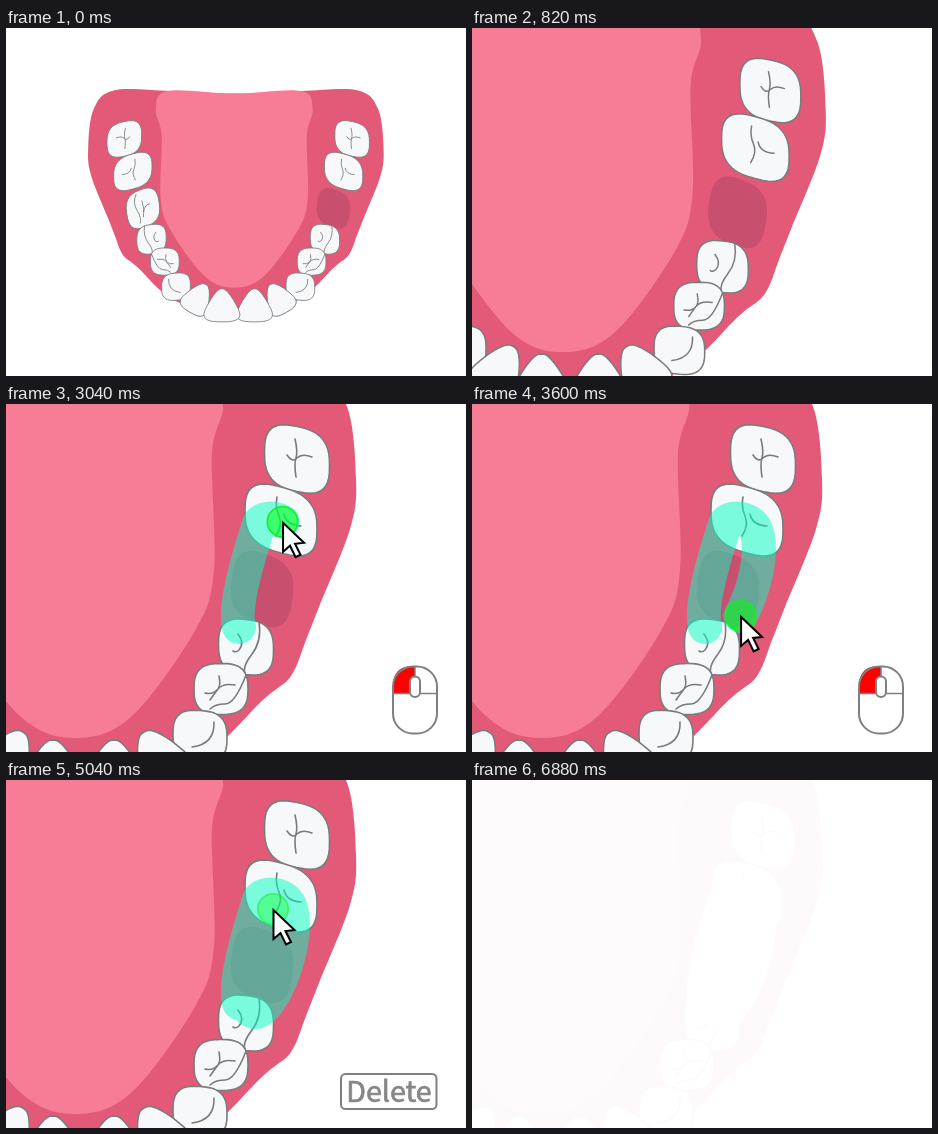
An HTML page that plays this animation: 460x348 px, repeating every 7500 ms.

```html
<!DOCTYPE html>
<html lang="en">
<head>
<meta charset="utf-8">
<title>Brush and delete</title>
<style>
  html, body { margin: 0; width: 100%; height: 100%; overflow: hidden; background: #fff; }
  svg { display: block; width: 460px; height: 348px; }
  .tooth { fill: #f7f8fa; stroke: #7b7b7b; stroke-width: 1.6; }
  .groove { fill: none; stroke: #7b7b7b; stroke-width: 1.6; stroke-linecap: round; }
  .gap { fill: #c94f6f; }
  .outline { fill: none; stroke: #808080; stroke-width: 2; }
  #label text {
    font: 500 28.6px "Noto Sans CJK SC", "Noto Sans CJK JP", "Noto Sans", sans-serif;
    fill: #868686; stroke: #868686; stroke-width: .7; text-anchor: middle;
  }
</style>
</head>
<body>
<svg viewBox="0 0 460 348">
  <g id="scene">
    <path id="gum" fill="#e35a78"/>
    <path id="palate" fill="#f67d95"/>
    <g id="right"></g>
    <g id="left" transform="translate(154.8) scale(-1 1)"></g>
  </g>
  <path id="trail" fill="none" stroke-width="34" stroke-linecap="round" stroke-linejoin="round"
    d="M233 223C228 204 240 160 253 120C256 112 278 112 284 126C296 158 268 229 250 232C232 232 256 205 256 180Q256 172 259 165L267 129"/>
  <g id="mouse">
    <path id="button" fill="#f00" d="M409 262V289.500H387V282Q387 262 407 262Z"/>
    <rect class="outline" x="387" y="262.500" width="44" height="67" rx="20"/>
    <path class="outline" style="stroke-width:1.500" d="M387 289.500H431M409 262V273"/>
    <rect class="outline" x="404" y="272.500" width="10" height="20.500" rx="5" style="fill:#fff"/>
  </g>
  <g id="label">
    <rect class="outline" x="335" y="294" width="95.500" height="35" rx="4.500"/>
    <text x="383" y="322">Delete</text>
  </g>
  <circle id="dot" r="15.200" fill="#0f0" fill-opacity=".5" stroke="#12ee24" stroke-width="1.600"/>
  <path id="cursor" fill="#fff" stroke="#000" stroke-width="2" d="M0 0V29L7 23L12.500 34.500L17.500 32L12 21L21 20Z"/>
  <rect id="veil" width="460" height="348" fill="#fff"/>
</svg>
<script>
const $ = id => document.getElementById(id);
const clamp = (v, a = 0, b = 1) => Math.min(b, Math.max(a, v));
const span = (t, a, b) => clamp((t - a) / (b - a));

// Closed smooth outline: the right half, mirrored at its first point
function mirrored(half) {
  const axis = half[0][0];
  const p = [...half, ...half.slice(1, -1).reverse().map(([x, y]) => [2 * axis - x, y])];
  const at = i => p[(i + p.length) % p.length];
  return p.reduce((d, b, i) => {
    const a = at(i - 1), c = at(i + 1), e = at(i + 2);
    const c1 = b.map((v, k) => v + (c[k] - a[k]) / 6);
    const c2 = c.map((v, k) => v - (e[k] - b[k]) / 6);
    return d + `C${c1} ${c2} ${c}`;
  }, 'M' + p[0]) + 'Z';
}

$('gum').setAttribute('d', mirrored([[73, -30], [195, -35], [302, -36], [340, 0], [350, 75], [344, 125],
  [313, 203], [300, 236], [285, 272], [258, 295], [186, 359], [73, 387]]));
$('palate').setAttribute('d', mirrored([[70, -30], [195, -35], [217, 0], [206, 50], [208, 165],
  [190, 225], [126, 312], [70, 334]]));

// Superellipse, narrowed toward the top by the taper
function crown(w, h, taper) {
  const power = v => Math.sign(v) * Math.abs(v) ** (2 / 2.8);
  const points = Array.from({ length: 48 }, (_, i) => {
    const a = i / 24 * Math.PI, y = power(Math.sin(a));
    const x = power(Math.cos(a)) * (1 + taper * y) / (1 + taper * .2);
    return [(x * w / 2).toFixed(2), (y * h / 2).toFixed(2)];
  });
  return `M${points.join('L')}Z`;
}

function addPath(parent, cls, d, transform) {
  const el = document.createElementNS('http://www.w3.org/2000/svg', 'path');
  el.setAttribute('class', cls);
  el.setAttribute('d', d);
  el.setAttribute('transform', transform);
  parent.append(el);
}

// One side of the arch, from the back to the front
const teeth = [
  { x: 291, y: 55, w: 65, h: 65, slant: 12, groove: 'M-2 -20Q1 -7 -1 -1T-1 18M-10 -4Q-5 4 0 -1T15 -2' },
  { x: 275, y: 116, w: 72, h: 66, slant: 15, groove: 'M-4 -23Q-6 -13 -2 -4T-5 16M3 -6Q5 5 20 6' },
  { x: 256, y: 185, w: 61, h: 72, slant: 13, tilt: 8, missing: true, groove: 'M13 -26Q20 -10 11 4T5 28M2 -14Q-4 2 -1 16M-1 6Q-4 -8 -12 -8' },
  { x: 240, y: 243, w: 55, h: 55, slant: 6, groove: 'M13 -25Q16 -6 6 7T-1 27M-8 -13Q-1 -4 -7 3Q-10 6 -13 4' },
  { x: 215, y: 285, w: 54, h: 51, groove: 'M-2 -13Q0 -4 -3 0T-11 11M-16 4Q-8 6 -3 0T14 -4M-11 20Q-6 15 4 15T25 -14' },
  { x: 194, y: 332, w: 54, h: 51, slant: 4, groove: 'M14 -14Q15 8 -8 11' },
  { x: 153, y: 354, w: 50, h: 60, tilt: -30, taper: .5 },
  { x: 108, y: 367, w: 61, h: 62, taper: .6 }
];

for (const side of ['right', 'left']) {
  for (const { x, y, w, h, slant = 0, tilt = 0, taper = 0, missing, groove } of teeth) {
    const gap = missing && side === 'right', place = `translate(${x} ${y})`;
    addPath($(side), gap ? 'gap' : 'tooth', crown(w, h, taper), `${place} skewY(${slant}) rotate(${tilt})`);
    if (groove && !gap) addPath($(side), 'groove', groove, place);
  }
}

// Brush travel: slow start, even middle, slow stop
const trail = $('trail'), length = trail.getTotalLength();
const OUT = 2.6, TOTAL = 1 / 3 + 2 + 1 / OUT;

function travelled(t) {
  const u = clamp((t - 1800) / 760, 0, 4);
  let d = u - 2 / 3;
  if (u < 1) d = u ** 3 / 3;
  if (u > 3) d = 7 / 3 + (1 - (4 - u) ** OUT) / OUT;
  return d / TOTAL * length;
}

const fade = (id, v) => {
  $(id).style.opacity = v;
  $(id).style.visibility = v > 0 ? 'visible' : 'hidden';
};

function draw(t) {
  const zoom = span(t, 300, 900), k = (1 + .875 * zoom) / 1.875;
  $('scene').setAttribute('transform',
    `translate(${358 * (k - zoom)} ${153 * (k - zoom)}) scale(${k})`);

  const d = travelled(t), p = trail.getPointAtLength(d);
  const pressed = t >= 1820, wiped = t >= 5720;
  trail.style.strokeDasharray = d >= length - .01 ? 'none' : `${Math.max(d, .01)} ${length + 50}`;
  trail.style.stroke = wiped ? '#fff' : '#00ffc4';
  fade('trail', !pressed ? 0 : wiped ? 1 : .5);

  $('dot').setAttribute('cx', p.x);
  $('dot').setAttribute('cy', p.y);
  fade('dot', pressed ? 1 - span(t, 4840, 5400) : 0);

  const enter = span(t, 1180, 1600), leave = span(t, 5100, 5400);
  const back = (1 - enter) ** 2, away = leave ** 2;
  $('cursor').setAttribute('transform',
    `translate(${p.x + .5 - 23 * back - 32 * away} ${p.y + 1 - 16 * back - 70 * away})`);
  fade('cursor', enter * (1 - leave));

  fade('mouse', t < 4840 ? enter : 0);
  $('button').style.fill = pressed ? '#f00' : '#fff';
  fade('label', t < 6020 ? span(t, 4840, 4960) : 0);
  fade('veil', Math.min(span(t, 6300, 6900), .967));
}

const start = performance.now();
function tick() {
  const t = (performance.now() - start) % 7500;
  draw(Math.floor(t / 20) * 20);
  requestAnimationFrame(tick);
}
tick();
</script>
</body>
</html>
```
